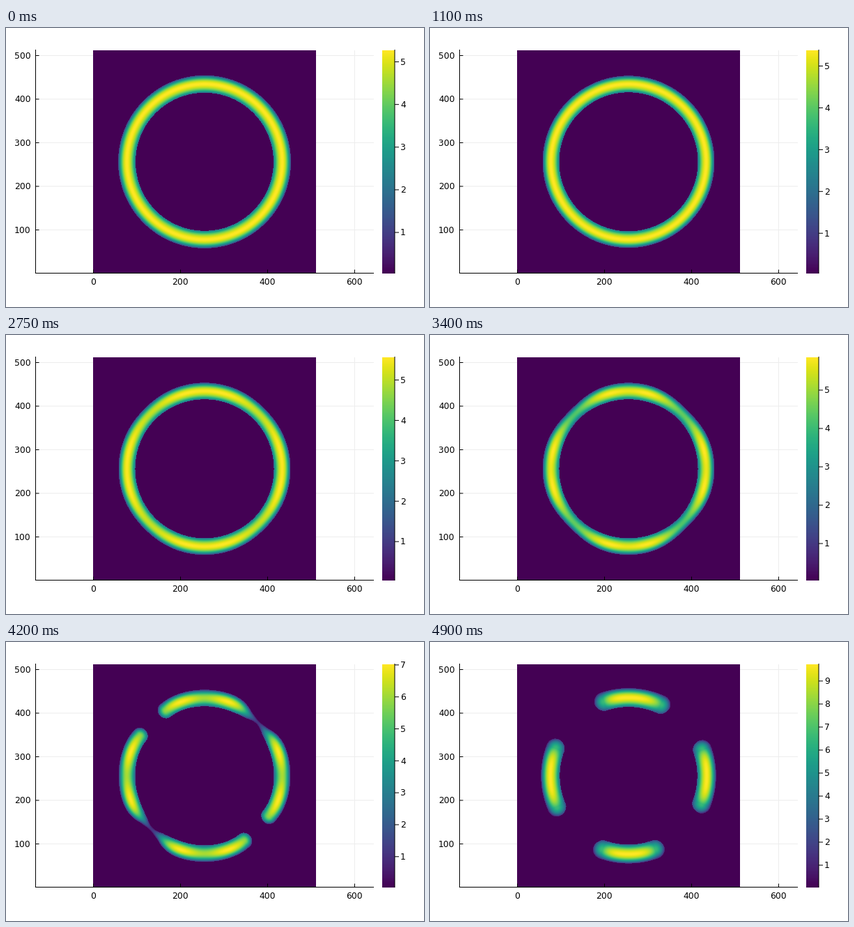
Recreate the animation shown at these times as a matplotlib script. Size 600 by 400 pixels, loop 4.95 s.

```python
import numpy as np
import matplotlib.pyplot as plt
from matplotlib.animation import FuncAnimation

W, H, DPI = 600, 400, 100
FRAMES, STEP = 99, 50
LAST = FRAMES - 1
PX = 72 / DPI
TOP, BOTTOM, LEFT, RIGHT = 32, 352, 42.5, 528
BASE = BOTTOM - 0.5
SCALE = 0.625
X0 = 125
CX, CY = 285, 191.8
RADIUS = 111.5
VMIN = 0.045
FONT = dict(family="DejaVu Sans", fontsize=8.9, color="black")

# Final half-length of each half arc in degrees, anticlockwise from the right
END_ANGLE = np.array([19.5, 24.4, 18.4, 20.6, 23.4, 19.3, 19.8, 20.9])
# Breaking frame and growth rate of the thin spot in each quadrant
SNAP = np.array([86, 79, 86, 79])
GROWTH = np.array([0.0775, 0.085, 0.0775, 0.085])

cells = np.arange(320) + 0.5
gx, gy = np.meshgrid(X0 + cells - CX, CY - (TOP + cells))
r = np.hypot(gx, gy)
theta = np.degrees(np.arctan2(gy, gx)) % 360
quad = (theta // 90).astype(int) % 4
psi = theta % 90 - 45
phi = 45 - np.abs(psi)
half = 2 * quad + (psi > 0)


def peak(f):
    keys = [0, 11, 22, 33, 39, 44, 55, 68, 84, 98]
    over = [0.078, 0.166, 0.184, 0.22, 0.238, 0.276, 0.37, 0.664, 1.83, 4.54]
    return 5.2 + np.exp(np.interp(f, keys, np.log(over)))


def density(f):
    """Ring that thins at the diagonals and breaks into four arcs."""
    age = np.clip(f - SNAP, 0, None)
    u = age / (LAST - SNAP)
    dip = np.minimum(0.1 * np.exp(GROWTH * (np.minimum(f, SNAP) - 55)), 0.85)
    dip = dip * np.exp(-age / 2)
    sigma = np.interp(f, [55, 68, 84], [20, 20, 14])
    amp = 1 - dip[quad] * np.exp(-(psi / sigma) ** 2)

    # Arc ends pull back once a quadrant has broken
    k = 1.8
    left = (np.exp(-k * u) - np.exp(-k)) / (1 - np.exp(-k))
    end = END_ANGLE + (41 - END_ANGLE) * np.repeat(left, 2)
    end = np.where(np.repeat(f < SNAP, 2), 46, end)[half]
    tip = np.minimum(phi / end, 1) ** 4

    thin = amp ** 0.8
    width = np.interp(f, [88, LAST], [12, 13.6]) + 0.6 * np.exp(-f / 3)
    w = width * thin
    center = RADIUS - 3.5 * np.clip(2 - 2 * thin, 0, 1)
    center = center + np.interp(f, [88, LAST], [0, 0.7])
    bend = np.where(age > 0, 3 * (1 - u), 0)
    center = center - bend[quad] * tip

    taper = 0.32 * np.sqrt(u)[quad] * tip
    middle = np.interp(f, [39, 55, 68, 84, 92, LAST],
                       [0, 0.02, 0.07, 0.16, 0.05, 0])
    amp = amp * (1 - taper) * (1 - middle * np.exp(-(phi / 12) ** 2))

    across = (r - center) / w
    along = np.radians(np.maximum(phi - end, 0)) * RADIUS / w
    d2 = across ** 2 + along ** 2
    curve = np.interp(f, [68, LAST], [0.73, 0.8])
    curve = curve + 0.09 * np.clip(2 * across, -1, 1)
    v = np.where(d2 < 1, amp * (1 - curve * d2), 0)
    return v / v.max()


fig = plt.figure(figsize=(W / DPI, H / DPI), dpi=DPI, facecolor="white")
ax = fig.add_axes([0, 0, 1, 1])
ax.axis("off")


def line(x, y, color="black", z=5):
    return ax.plot(x, y, color=color, lw=PX, zorder=z, snap=False,
                   solid_capstyle="butt")[0]


for n in (0, 200, 400, 600):
    x = X0 + SCALE * n + 0.5
    line([x, x], [TOP, BOTTOM], "#ededed", 1)
    line([x, x], [BASE, BASE - 5])
    ax.text(x - 0.5, 364.5, str(n), ha="center", va="center", **FONT)
for n in range(100, 501, 100):
    y = BOTTOM - SCALE * n
    line([LEFT, RIGHT], [y, y], "#ededed", 1)
    line([LEFT, LEFT + 5], [y, y])
    ax.text(35.5, y + 0.8, str(n), ha="right", va="center", **FONT)
line([LEFT, LEFT], [TOP - 1, BOTTOM])
line([LEFT, RIGHT], [BASE, BASE])

image = ax.imshow(density(0), cmap="viridis", vmin=0, vmax=1, zorder=2,
                  extent=(X0, X0 + 320, BOTTOM, TOP), interpolation="nearest")
ax.imshow(np.linspace(1, 0, 320)[:, None], cmap="viridis", zorder=2,
          extent=(540, 558, BOTTOM, TOP), interpolation="nearest")
line([558, 558], [TOP - 1, BOTTOM])
ticks = [(n, line([558, 564], [0, 0]),
          ax.text(566, 0, str(n), ha="left", va="center", **FONT))
         for n in range(1, 10)]

ax.set_xlim(0, W)
ax.set_ylim(H, 0)
ax.set_aspect("auto")


def update(f):
    image.set_data(density(f))
    top = peak(f)
    for n, mark, label in ticks:
        y = BASE - (n - VMIN) / (top - VMIN) * (BOTTOM - TOP)
        mark.set_ydata([y, y])
        label.set_y(y + 0.8)
        mark.set_visible(n <= top)
        label.set_visible(n <= top)
    return []


anim = FuncAnimation(fig, update, frames=FRAMES, interval=STEP, repeat=True,
                     repeat_delay=0, init_func=lambda: update(0))
plt.show()
```
